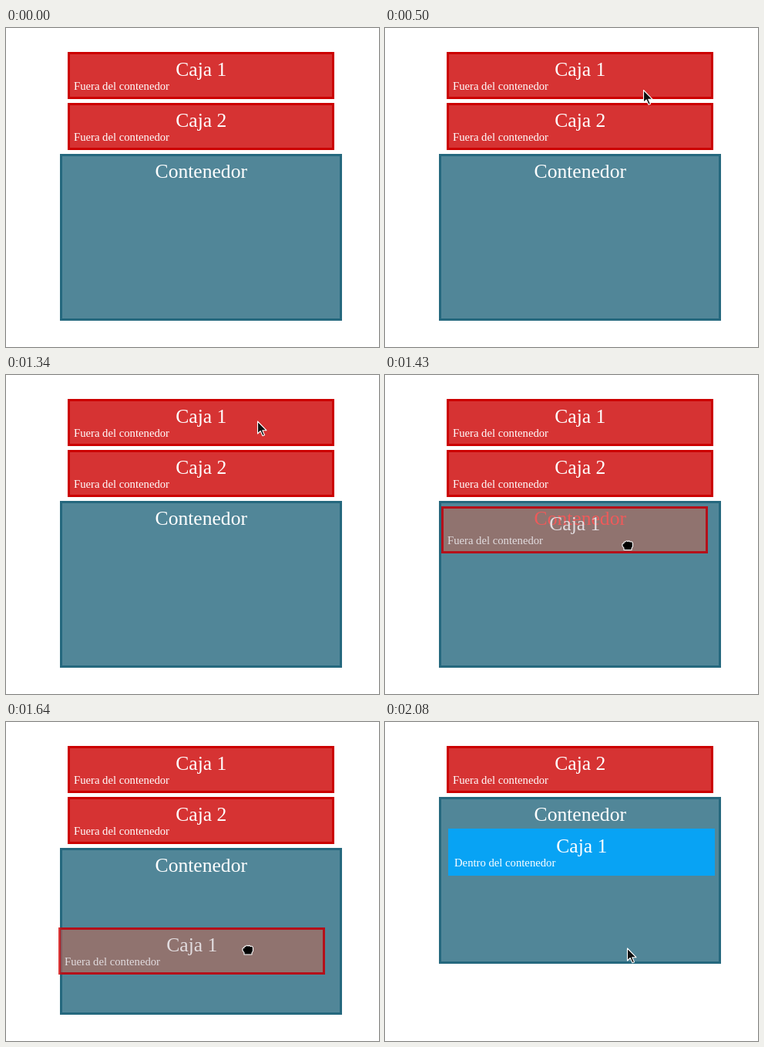
Recreate the animation shown at these times as an HTML page. Size 484 by 413 pixels, loop 2630 ms.

```html
<!DOCTYPE html>
<html lang="es">
<head>
<meta charset="utf-8">
<title>Arrastrar y soltar</title>
<style>
html, body { margin: 0; width: 100%; height: 100%; overflow: hidden; background: #fff; }
svg { display: block; }
text { font-family: "Liberation Serif", "Times New Roman", serif; fill: #fff; white-space: pre; }
.head { font-size: 25.6px; text-anchor: middle; }
.note { font-size: 14.7px; }
#ghost text { fill: #e2dde0; }
</style>
</head>
<body>
<svg id="stage" width="484" height="413" viewBox="0 0 484 413" xmlns="http://www.w3.org/2000/svg">
  <defs>
    <clipPath id="ghostArea"><rect id="ghostClip" width="346" height="61"/></clipPath>
    <clipPath id="outerArea"><rect x="70" y="163" width="366" height="216"/></clipPath>
    <clipPath id="innerArea"><rect x="73" y="166" width="360" height="210"/></clipPath>
  </defs>
  <g id="box1"></g>
  <g id="box2"></g>
  <g id="container"></g>
  <g id="inside"></g>
  <g id="ghost">
    <g id="ghostBase"></g>
    <g clip-path="url(#outerArea)"><g id="ghostEdge"></g></g>
    <g clip-path="url(#innerArea)"><g id="ghostFill"></g></g>
    <g clip-path="url(#ghostArea)">
      <text class="head" x="253.3" y="194" style="fill:#ee5a5a">Contenedor</text>
    </g>
    <g id="ghostFrame"></g>
  </g>
  <path id="arrow" d="M0 0V16L3.7 12.5L6.5 18.8L9 17.7L6.3 11.7H11.4Z"
        fill="#111" stroke="#fff" stroke-width="1.1" stroke-linejoin="round"/>
  <path id="hand" d="M-5 6V3.5L-7 1V-1.5Q-7-2.7-5-2.5V-3.5Q-4.5-5.2-3-4.5Q-1.5-6.6 0-5Q2-6.5 3-4.5Q6-5.4 6.5-2.5V1.5L5 4V6Z"
        fill="#000" stroke="#fff" stroke-width="1.1" stroke-linejoin="round"/>
</svg>
<script>
const LOOP = 2630;
const RED = "#cc0000";
const el = id => document.getElementById(id);

const frame = (w, h, fill, stroke) =>
  `<rect x="1.5" y="1.5" width="${w - 3}" height="${h - 3}" fill="${fill}" stroke="${stroke}" stroke-width="3"/>`;
const plain = (fill, opacity = 1) =>
  `<rect width="346" height="61" fill="${fill}" opacity="${opacity}"/>`;
const head = (label, x) => `<text class="head" x="${x}" y="31">${label}</text>`;
const note = label => `<text class="note" x="8" y="49">${label}</text>`;
const labels = (title, sub) => head(title, 173.3) + note(sub);

const OUT = "Fuera del contenedor";
el("box1").innerHTML = frame(346, 61, "#d63333", RED) + labels("Caja 1", OUT);
el("box2").innerHTML = frame(346, 61, "#d63333", RED) + labels("Caja 2", OUT);
el("container").innerHTML = frame(366, 216, "#518698", "#25687e") + head("Contenedor", 183.3);
el("inside").innerHTML = plain("#08a3f4") + labels("Caja 1", "Dentro del contenedor");

// The ghost tints differently over the page, the container's border and its fill.
el("ghostBase").innerHTML = plain(RED, 0.65) + frame(346, 61, "none", "#dc3c3c");
el("ghostEdge").innerHTML = plain("#855c60") + frame(346, 61, "none", "#ac1820");
el("ghostFill").innerHTML = plain("#90736f");
el("ghostFrame").innerHTML =
  `<g clip-path="url(#innerArea)"><g id="ghostLine">${frame(346, 61, "none", "#b5101a")}</g></g>` +
  `<g id="ghostText">${labels("Caja 1", OUT)}</g>`;

const place = (id, x, y) => el(id).setAttribute("transform", `translate(${x} ${y})`);
const show = (id, on) => el(id).setAttribute("visibility", on ? "visible" : "hidden");

// start time, ghost x, y, hand x, y
const drag = [
  [1380, 78, 84, 322, 135],
  [1430, 73, 170, 315, 220.5],
  [1480, 68, 226, 312, 270],
  [1520, 65, 257, 312, 293],
  [1560, 66, 262, 313, 294],
  [1600, 67, 265, 314, 295],
  [1640, 68, 266, 314, 295]
];

function pointer(t) {
  if (t >= 2040) return [314.5, 293];
  if (t >= 770) return [326.5, 60];
  if (t >= 730) return [327.5, 60];
  const k = Math.min(13, Math.floor((t - 140) / 40)) / 13;
  return [430 - 101 * (1 - (1 - k) ** 2.4), 124 - 64 * k].map(v => Math.round(v) + 0.5);
}

function render(t) {
  const dropped = t >= 2080;
  const dragging = t >= 1380 && !dropped;
  const holding = t >= 1380 && t < 2040;

  place("box1", 80, 31);
  place("box2", 80, dropped ? 31 : 97);
  place("container", 70, dropped ? 97 : 163);
  place("inside", 82, 138);
  show("box1", !dropped);
  show("inside", dropped);
  show("ghost", dragging);
  show("hand", holding);
  show("arrow", t >= 140 && !holding);

  if (dragging) {
    const [, x, y, hx, hy] = drag.filter(d => d[0] <= t).pop();
    for (const id of ["ghostBase", "ghostEdge", "ghostFill", "ghostLine", "ghostText"]) place(id, x, y);
    el("ghostClip").setAttribute("x", x);
    el("ghostClip").setAttribute("y", y);
    place("hand", hx, hy);
  }
  if (t >= 140) place("arrow", ...pointer(t));
}

const start = performance.now();
function tick() {
  render((performance.now() - start) % LOOP);
  requestAnimationFrame(tick);
}
render(0);
requestAnimationFrame(tick);
</script>
</body>
</html>
```
